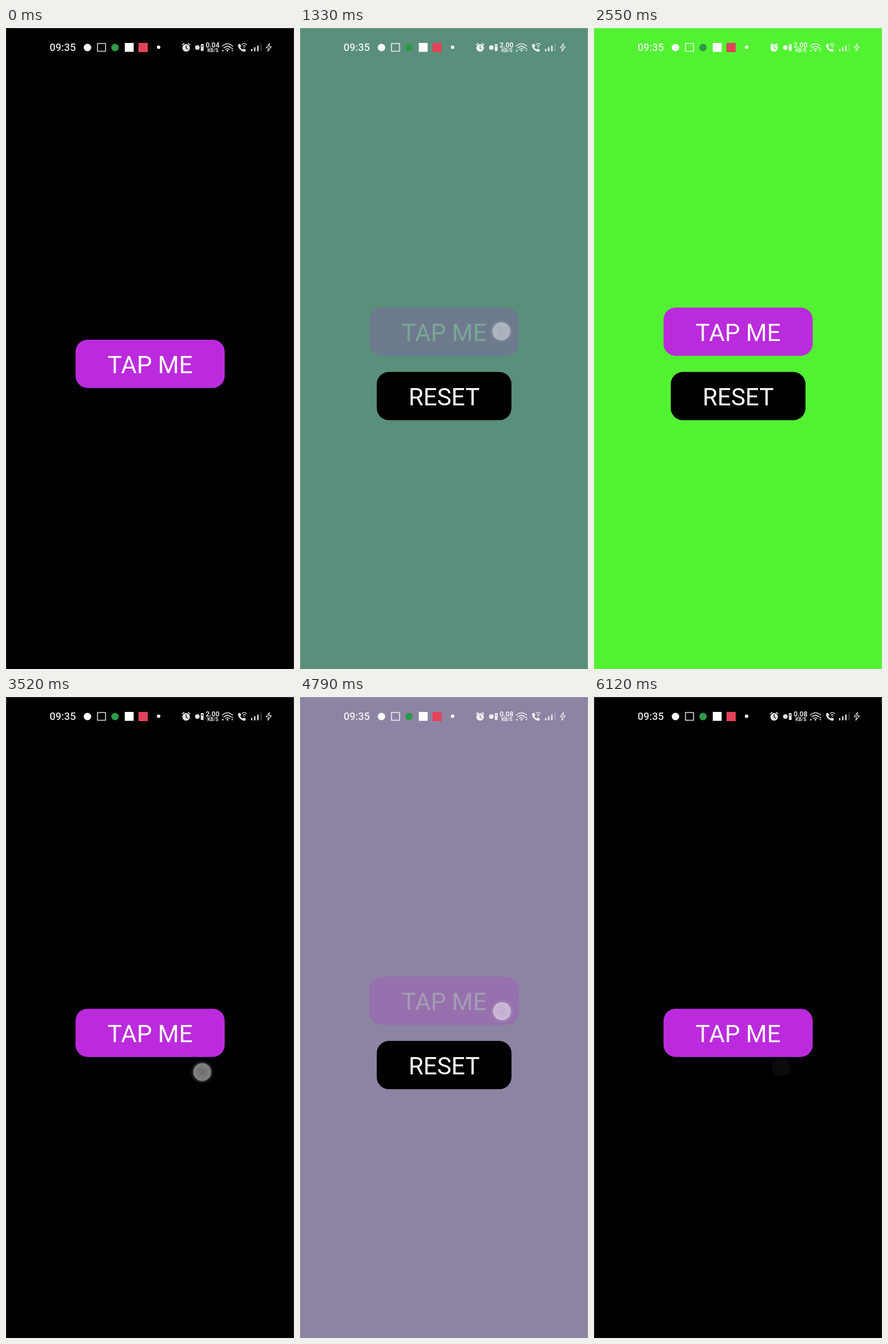
An HTML page for the animation above (6.45 s loop, 502 by 1116 pixels).

```html
<!DOCTYPE html>
<html lang="en">
<head>
<meta charset="utf-8">
<title>Tap me</title>
<style>
  html, body { margin: 0; width: 100%; height: 100%; overflow: hidden; background: #000; }
  svg { display: block; width: 100vw; height: 100vh; font-family: Roboto, sans-serif; }
  .label { font-size: 42px; fill: #fff; text-anchor: middle; }
  .status { fill: #fff; }
  .soft { opacity: .88; }
  .line { fill: none; stroke: #fff; stroke-width: 1.6; stroke-linecap: round; stroke-linejoin: round; }
  .thin { stroke-width: 1.2; }
  .speed { font-weight: 700; text-anchor: middle; }
  .cut { fill: none; stroke: var(--page, #000); stroke-width: 1.3; stroke-linecap: round; }
</style>
</head>
<body>
<svg id="stage" viewBox="0 0 502 1116" preserveAspectRatio="none">
  <defs>
    <radialGradient id="glow">
      <stop offset="0" stop-color="#fff" stop-opacity=".43"/>
      <stop offset=".66" stop-color="#fff" stop-opacity=".5"/>
      <stop offset=".74" stop-color="#fff" stop-opacity=".5"/>
      <stop offset=".78" stop-color="#ccc" stop-opacity=".2"/>
      <stop offset="1" stop-color="#ccc" stop-opacity="0"/>
    </radialGradient>
  </defs>

  <rect id="page" width="502" height="1116"/>
  <path d="M.5 1116V.5H501.5V1116" fill="none" stroke="#fff" stroke-opacity=".2"/>

  <g class="status">
    <text class="soft" x="76" y="40" font-size="18" font-weight="500">09:35</text>
    <circle cx="142" cy="34" r="6.5"/>
    <rect class="line soft" x="159.5" y="27" width="14" height="13.5"/>
    <circle cx="190" cy="34" r="6.5" fill="#2c9a48"/>
    <rect x="207" y="26" width="15.5" height="15.5"/>
    <rect x="231" y="26" width="16" height="16" fill="#e3435a"/>
    <circle cx="266" cy="33.5" r="3"/>

    <g class="soft">
      <!-- alarm -->
      <circle cx="314" cy="34.7" r="6.6"/>
      <path class="line" d="M307.5 29.3l2.8-2.5M320.5 29.3l-2.8-2.5"/>
      <path class="cut" d="M314 31v4l2.6 1.8"/>

      <!-- wireless and its battery -->
      <circle cx="333.5" cy="34" r="4"/>
      <rect x="339.5" y="28" width="5" height="12" rx="1.2"/>
      <path class="cut" d="M341.4 31.5h1.2"/>

      <text id="speed" class="speed" x="360" y="34" font-size="12">0.04</text>
      <text class="speed" x="360.5" y="42" font-size="8.5">KB/S</text>

      <!-- wifi -->
      <path class="line" d="M377 31.5q9-8 18 0M379.8 34.6q6.2-5.6 12.4 0M382.6 37.5q3.4-3 6.8 0"/>
      <circle cx="386" cy="39.6" r="1.5"/>
      <path d="M376 40.5l2-3 2 3zM392.5 36.5h4l-2-2.2zM392.5 38.5h4l-2 2.2z"/>

      <!-- call -->
      <path d="M405 28.5l3-1 2.2 4-1.8 1.7q1.4 3 4.2 4.3l1.8-1.8 3.8 2.2-1 3q-2 1-5-.4-6.2-3-7.8-9-.3-1.8.6-3z"/>
      <path class="line thin" d="M411.3 28.7q4-3.6 8 0M413.3 31.3q2-1.8 4 0"/>
      <circle cx="415.3" cy="33.6" r="1"/>

      <!-- signal and charging -->
      <path d="M427 36.5h2.5v4H427zM432.3 33.5h2.5v7h-2.5zM437.8 30.5h2.5v10h-2.5z"/>
      <path d="M443.5 27h2.3v13.5h-2.3z" opacity=".25"/>
      <path class="line thin" d="M459.3 26.8l-6 7.7h4.2l-1.2 6.2 6.2-8h-4.3z"/>
    </g>
  </g>

  <g id="tap">
    <rect x="121.2" y="542.7" width="260" height="84" rx="21" fill="#bb2bdd"/>
    <text class="label" x="251.2" y="601">TAP ME</text>
  </g>
  <g id="reset">
    <rect x="133.8" y="598.8" width="234.8" height="84" rx="21" fill="#000"/>
    <text class="label" x="251.2" y="657.2">RESET</text>
  </g>
  <circle id="touch" r="20.5" fill="url(#glow)"/>
</svg>

<script>
const LOOP = 6450, LAST_CHANGE = 6120;
const PRESS_IN = 20, RELEASE = 85, PRESS_OUT = 120, FADE_OUT = 230;
const TOUCH_GONE = 220, TOUCH_FADE = 110;
const DIMMED = 0.2;

// Touches on TAP ME carry the next page colour; those without one hit RESET.
const touches = [
  { at: 390,  x: 350, y: 573, color: '#e26235' },
  { at: 1210, x: 351, y: 528, color: '#5a8f7b' },
  { at: 1700, x: 351, y: 519, color: '#353648' },
  { at: 2210, x: 351, y: 522, color: '#52f232' },
  { at: 2730, x: 351, y: 526, color: '#6f7fa8' },
  { at: 3420, x: 342, y: 653 },
  { at: 4270, x: 352, y: 560, color: '#7a9a62' },
  { at: 4700, x: 352, y: 547, color: '#8d83a2' },
  { at: 5210, x: 350, y: 547, color: '#a0786a' },
  { at: 5560, x: 348, y: 549, color: '#5f8f98' },
  { at: 5910, x: 326, y: 644 }
];

const $ = id => document.getElementById(id);
const [stage, page, tap, reset, touch, speed] =
  ['stage', 'page', 'tap', 'reset', 'touch', 'speed'].map($);
const clamp = v => Math.max(0, Math.min(1, v));
const easeInOut = p => p < 0.5 ? 2 * p * p : 1 - 2 * (1 - p) ** 2;

function buttonOpacity(age) {
  if (age < PRESS_IN) return 1;
  return DIMMED + (1 - DIMMED) * easeInOut(clamp((age - PRESS_OUT) / FADE_OUT));
}

function draw(time) {
  const t = Math.min(time, LAST_CHANGE);
  const current = touches.findLast(c => c.at <= t);
  const released = touches.findLast(c => c.at + RELEASE <= t);
  const color = released?.color;
  const age = current ? t - current.at : Infinity;
  const opacity = buttonOpacity(age);
  const onTap = Boolean(current?.color);

  page.setAttribute('fill', color || '#000');
  stage.style.setProperty('--page', color || '#000');
  tap.setAttribute('transform', `translate(0 ${color ? -56 : 0})`);
  tap.setAttribute('opacity', onTap ? opacity : 1);
  reset.setAttribute('visibility', color ? 'visible' : 'hidden');
  reset.setAttribute('opacity', onTap ? 1 : opacity);

  touch.setAttribute('opacity', clamp((TOUCH_GONE - age) / TOUCH_FADE));
  if (current) {
    touch.setAttribute('cx', current.x);
    touch.setAttribute('cy', current.y);
  }
  speed.textContent = t < 30 ? '0.04' : t < 4000 ? '2.00' : '0.08';
}

const start = performance.now();
function tick() {
  draw((performance.now() - start) % LOOP);
  requestAnimationFrame(tick);
}
tick();
</script>
</body>
</html>
```
